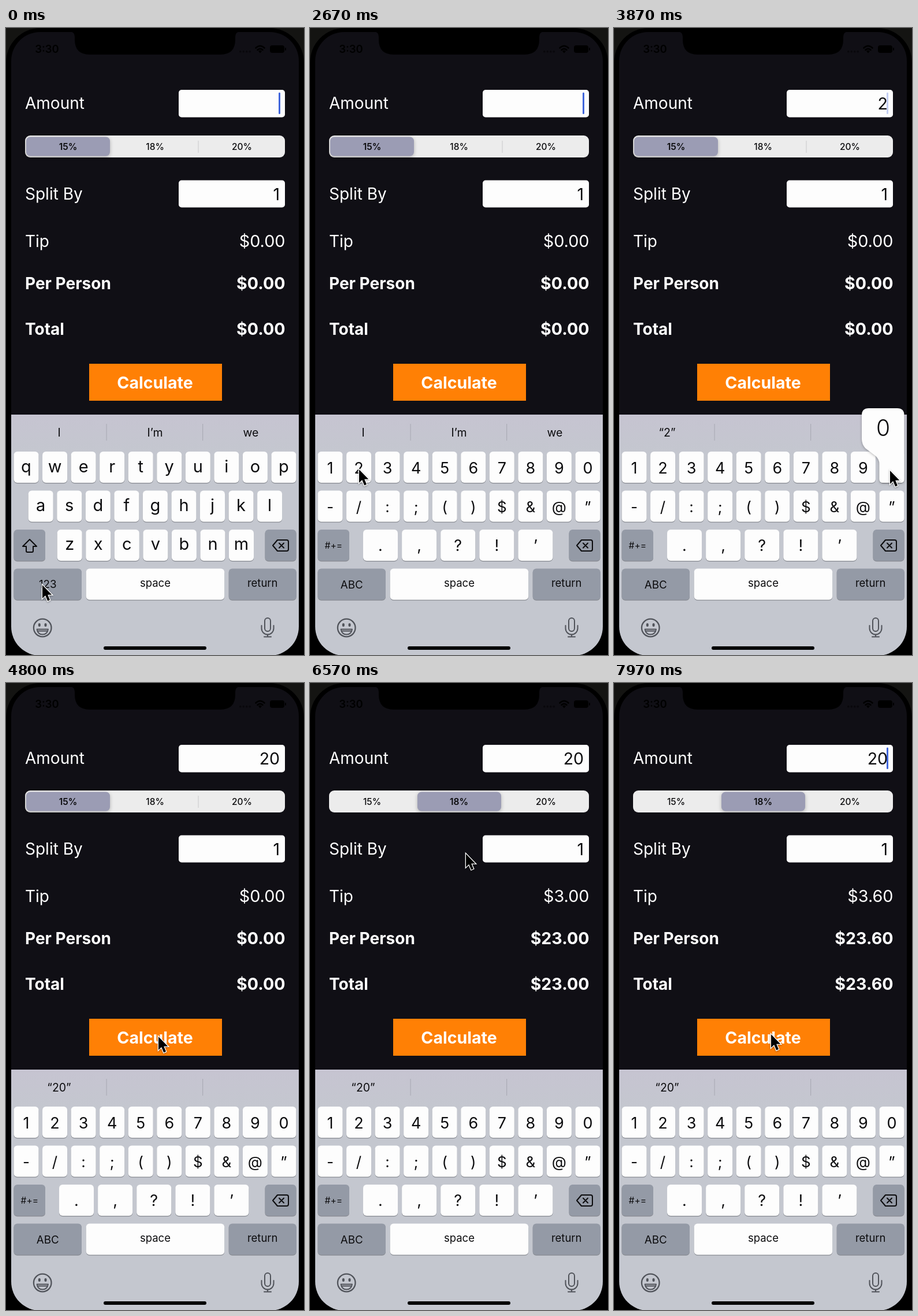
Write an HTML page with a canvas that moves like this. It is 516 px wide and 1085 px high and loops after 8 s.

```html
<!DOCTYPE html>
<html lang="en">
<head>
<meta charset="utf-8">
<title>Tip calculator</title>
<style>
  html, body { margin: 0; width: 100%; height: 100%; overflow: hidden; background: #000; }
  canvas { display: block; }
</style>
</head>
<body>
<canvas id="stage" width="516" height="1085"></canvas>
<script>
const ctx = document.getElementById('stage').getContext('2d');
const LOOP = 8000;

// Moments, in ms, at which the state changes
const KEYS_SWAP = 300, TYPE_TWO = 2860, TYPE_ZERO = 3960;
const FIRST_SUM = 5060, PICK_18 = 6020, SECOND_SUM = 7640;
const PRESS_TWO = 2720, PRESS_ZERO = 3800;

// Pointer stops: time, x, y
const PATH = [
  [0, 63, 964], [850, 64, 960], [1130, 78, 781], [1450, 85, 764],
  [2980, 85, 764], [3300, 500, 772], [3420, 499, 772], [3700, 478, 766],
  [4180, 478, 766], [4750, 264, 612], [5250, 264, 612], [5720, 270, 211],
  [6420, 270, 211], [6950, 270, 640], [7150, 270, 640], [7480, 272, 608], [LOOP, 272, 608]
];

const clamp = v => Math.min(1, Math.max(0, v));
const smooth = v => { v = clamp(v); return v * v * (3 - 2 * v); };

function pointerAt(t) {
  const i = PATH.findIndex(p => p[0] > t);
  const [t0, x0, y0] = PATH[i - 1], [t1, x1, y1] = PATH[i];
  const k = smooth((t - t0) / (t1 - t0));
  return [x0 + (x1 - x0) * k, y0 + (y1 - y0) * k];
}

function caretAlpha(t) {
  const sinceKey = t - (t >= TYPE_ZERO ? TYPE_ZERO : TYPE_TWO);
  if (sinceKey >= 0 && sinceKey < 500) return 1;
  const peak = t < TYPE_TWO ? 830 : 1135;
  return clamp(0.5 + 2.2 * Math.cos((t - peak) / 1000 * 2 * Math.PI));
}

function box(x, y, w, h, r, fill) {
  ctx.fillStyle = fill;
  ctx.beginPath();
  ctx.roundRect(x, y, w, h, r);
  ctx.fill();
}

function text(str, x, y, size, color = '#fff', align = 'left', weight = 400) {
  ctx.font = `${weight} ${size}px Inter, "Open Sans", sans-serif`;
  ctx.textAlign = align;
  ctx.fillStyle = color;
  ctx.fillText(str, x, y);
}

function trace(d, width, color) {
  ctx.strokeStyle = color;
  ctx.lineWidth = width;
  ctx.lineJoin = ctx.lineCap = 'round';
  ctx.stroke(new Path2D(d));
}

function shadow(color, blur, y) {
  ctx.shadowColor = color;
  ctx.shadowBlur = blur;
  ctx.shadowOffsetY = y;
}
const noShadow = () => shadow('transparent', 0, 0);

function phone() {
  ctx.fillStyle = '#141412';
  ctx.fillRect(0, 0, 516, 1085);
  box(0, 0, 516, 1150, 60, '#000');
  ctx.save();
  ctx.beginPath();
  ctx.roundRect(9, 7, 498, 1079, 50);
  ctx.clip();
  ctx.fillStyle = '#100f15';
  ctx.fillRect(0, 0, 516, 670);
  const g = ctx.createLinearGradient(0, 669, 0, 740);
  g.addColorStop(0, '#c6c4d1');
  g.addColorStop(1, '#c4c7cf');
  ctx.fillStyle = g;
  ctx.fillRect(0, 669, 516, 416);
  ctx.restore();

  // Notch with flared shoulders
  ctx.fillStyle = '#000';
  ctx.fill(new Path2D('M111 6Q119 7 119 15V20Q119 46 145 46H371Q397 46 397 20V15Q397 7 405 6Z'));

  // Status bar
  text('3:30', 71, 43, 18.5, '#000', 'center', 600);
  for (let i = 0; i < 4; i++) box(404 + i * 5.5, 39, 3.5, 3.5, 1.5, '#09080c');
  trace('M432.5 34.5Q440 27.5 447.500 34.5M435.500 38Q440 34 444.500 38', 2.6, '#000');
  ctx.fillStyle = '#000';
  ctx.fill(new Path2D('M437 40Q440 37.500 443 40L440 43.500Z'));
  box(457, 30, 25, 13, 4, '#000');
  box(483, 34, 2, 5, 1, '#000');
}

function form(t) {
  const ink = '#0c0c0e';
  text('Amount', 33, 140, 28);
  text('Split By', 33, 297, 28);
  text('Tip', 33, 379, 28);
  text('Per Person', 33, 452, 28, '#fff', 'left', 700);
  text('Total', 33, 531, 28, '#fff', 'left', 700);

  box(299, 107, 184, 47.5, 5, '#fdfdfd');
  box(299, 263.500, 184, 47, 5, '#fdfdfd');
  text(t < TYPE_TWO ? '' : t < TYPE_ZERO ? '2' : '20', 474, 141, 28.5, ink, 'right');
  text('1', 474, 298, 28.5, ink, 'right');
  ctx.globalAlpha = caretAlpha(t);
  box(472, 111.500, 3, 37.500, 1.5, '#4166db');
  ctx.globalAlpha = 1;

  // Tip rate selector
  const slide = smooth((t - PICK_18) / 300);
  const rate = t < PICK_18 ? 0 : 1;
  box(33, 186, 450, 38, 9, '#ececec');
  ctx.globalAlpha = 1 - slide;
  box(332.500, 195, 1, 21, 0, '#c8c8ca');
  ctx.globalAlpha = 1;
  shadow('rgba(0,0,0,.25)', 6, 2);
  box(35 + 151 * slide, 188.500, 145, 33, 7, '#9b9cb4');
  noShadow();
  ['15%', '18%', '20%'].forEach((s, i) =>
    text(s, 107.500 + i * 150.500, 210.500, 15.5, ink, 'center', i === rate ? 600 : 500));

  const [tip, total] = t < FIRST_SUM ? ['$0.00', '$0.00']
    : t < SECOND_SUM ? ['$3.00', '$23.00'] : ['$3.60', '$23.60'];
  text(tip, 483.500, 379, 28.8, '#fff', 'right');
  text(total, 483.500, 452, 28.6, '#fff', 'right', 700);
  text(total, 483.500, 531, 28.6, '#fff', 'right', 700);

  box(144, 581, 230, 64, 0, '#ff8005');
  text('Calculate', 258, 623.500, 28.5, '#fff', 'center', 700);
}

function key(x, y, w, label, size, base, gray) {
  box(x, y + 1.3, w, 54, 6, '#888b92');
  box(x, y, w, 54, 6, gray ? '#949aa6' : '#fdfdfd');
  if (label) text(label, x + w / 2, y + base, size, '#0c0c0e', 'center');
}

function row(chars, x, y, pitch, w, size, base) {
  [...chars].forEach((c, i) => key(x + i * pitch, y, w, c, size, base));
}

function popup(label, left, keyX) {
  const right = left + 73.5, keyR = keyX + 43, flush = right - keyR < 2;
  const neck = flush ? `V781` : `V712Q${right} 721 ${right - 5} 726L${keyR + 3} 739Q${keyR} 743 ${keyR} 750V781`;
  const d = `M${left + 12} 658H${right - 12}Q${right} 658 ${right} 670${neck}` +
    `Q${keyR} 787 ${keyR - 6} 787H${keyX + 6}Q${keyX} 787 ${keyX} 781V754` +
    `Q${keyX} 747 ${keyX - 6} 741L${left + 6} 727Q${left} 720 ${left} 711V670Q${left} 658 ${left + 12} 658Z`;
  shadow('rgba(0,0,0,.3)', 4, 1);
  ctx.fillStyle = '#fdfdfd';
  ctx.fill(new Path2D(d));
  noShadow();
  text(label, left + 37, 706, 39, '#0c0c0e', 'center', 300);
}

function keyboard(t) {
  const ink = '#0c0c0e', line = '#50535a', letters = t < KEYS_SWAP;

  const words = t < TYPE_TWO ? ['I', 'I’m', 'we'] : [t < TYPE_ZERO ? '“2”' : '“20”'];
  words.forEach((w, i) => text(w, 92 + i * 166, 707, 19.5, ink, 'center'));
  for (const x of [173.500, 340]) box(x, 685, 1.2, 29, 0, '#abacb6');

  if (letters) {
    row('qwertyuiop', 13.5, 733, 49.55, 43, 29, 36);
    row('asdfghjkl', 38.700, 800.500, 49.55, 43, 29, 35.5);
    row('zxcvbnm', 88.700, 868, 49.55, 43, 29, 35);
  } else {
    row('1234567890', 13.5, 733, 49.55, 43, 27, 37.5);
    row('-/:;()$&@”', 13.5, 800.500, 49.55, 43, 26, 37);
    row('.,?!’', 92, 868, 67.1, 60, 27, 37);
  }
  key(13.5, 868, 54.5, letters ? '' : '#+=', 15.5, 33, true);
  key(448.500, 868, 54, '', 0, 0, true);
  key(13.5, 935.500, 117.500, letters ? '123' : 'ABC', 18.8, letters ? 33 : 34, true);
  key(138.700, 935.500, 239.500, 'space', 18.5, 31.5);
  key(385.700, 935.500, 117, 'return', 18.5, 31.5, true);

  if (letters) trace('M41 885L53 897H47V905Q47 907 45 907H37Q35 907 35 905V897H29Z', 2, ink);
  trace('M470 886H486Q489 886 489 889V902Q489 905 486 905H470L462 895.500ZM473 891.500L481 899.500M481 891.500L473 899.500', 2, ink);

  // Emoji and microphone
  trace('M78.500 1038A15.3 15.3 0 1 1 47.900 1038A15.3 15.3 0 1 1 78.500 1038', 2.3, line);
  for (const x of [55.800, 66.5]) box(x, 1030, 4, 6, 2, line);
  trace('M53.500 1040.500H73Q71.500 1049.500 63.200 1049.500Q55 1049.500 53.500 1040.500ZM55 1043.500H71.500', 1.8, line);
  trace('M448 1026A5 5 0 0 1 458 1026V1039A5 5 0 0 1 448 1039ZM442.500 1034V1039A10.500 10.500 0 0 0 463.500 1039V1034M453 1049.500V1053.500M447 1053.500H459', 2, line);
  box(169, 1070, 178, 6, 3, '#000');

  if (t >= PRESS_TWO && t < TYPE_TWO) popup('2', 48, 63);
  if (t >= PRESS_ZERO && t < TYPE_ZERO) popup('0', 429, 459.500);
}

function pointer(t) {
  const [x, y] = pointerAt(t);
  const arrow = new Path2D('M0 0V23L5.200 18L9.200 27.500L13 25.800L9.200 16.800H16.300Z');
  ctx.save();
  ctx.translate(x, y);
  ctx.lineJoin = 'miter';
  ctx.lineWidth = 2.6;
  ctx.strokeStyle = '#fff';
  shadow('rgba(0,0,0,.35)', 3, 1);
  ctx.stroke(arrow);
  noShadow();
  ctx.fillStyle = '#000';
  ctx.fill(arrow);
  ctx.restore();
}

const start = performance.now();
function draw() {
  const t = (performance.now() - start) % LOOP;
  phone();
  form(t);
  keyboard(t);
  pointer(t);
  requestAnimationFrame(draw);
}
draw();
</script>
</body>
</html>
```
